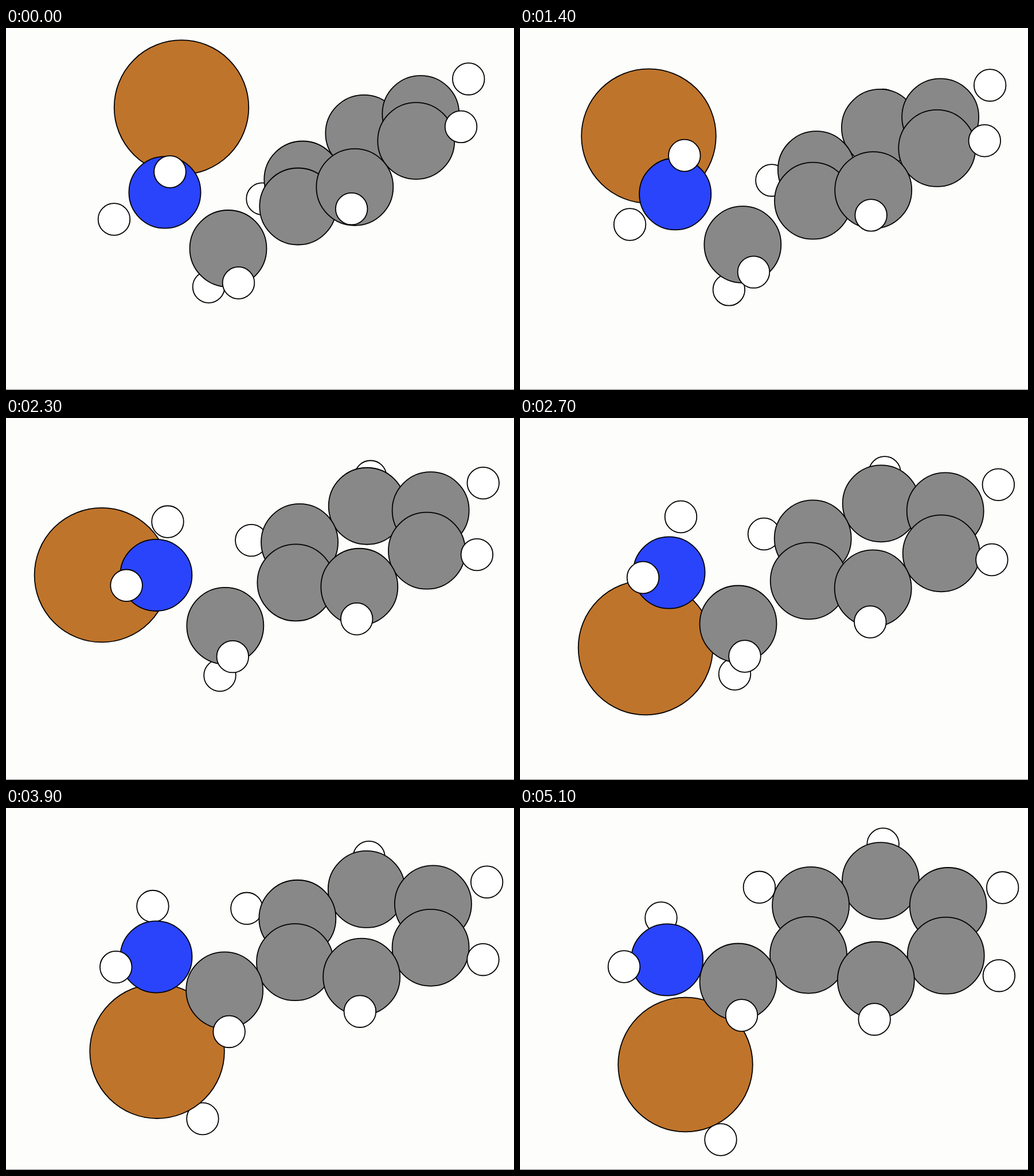
Animation, 886 px wide and 632 px high, one loop 5.2 s. Source, as an HTML page with a canvas:

```html
<!DOCTYPE html>
<html lang="en">
<head>
<meta charset="utf-8">
<title>Molecule</title>
<style>
  html, body { margin: 0; width: 100%; height: 100%; overflow: hidden; background: #fdfdfb; }
  canvas { display: block; }
</style>
</head>
<body>
<canvas id="stage" width="886" height="632"></canvas>
<script>
const ctx = document.getElementById('stage').getContext('2d');
const LOOP = 5200, STEP = 100;
const TIMES = [0, 900, 1800, 2700, 3500, 4400, 5100];

const KINDS = {
  metal: { r: 117.3, fill: '#bf742b' },
  nitrogen: { r: 62.6, fill: '#2a44fb' },
  carbon: { r: 67, fill: '#888888' },
  hydrogen: { r: 27.8, fill: '#ffffff' }
};

// Each path is a flat run of x, y pairs, one pair per entry of its times.
const paths = {
  centre: [616.3, 230.8, 619.5, 229.4, 624.1, 227.8, 622.7, 223.3, 623.8, 220.2, 625.3, 215.9, 624.9, 213.8],
  axisP: [107, -80.7, 109.2, -76.2, 112.6, -70.8, 119, -61, 119.9, -54.1, 121.1, -46.8, 121.9, -42.8],
  axisQ: [8, -47, 6.3, -50.7, 5.5, -57.7, 7, -74, 5.2, -73.5, 3.2, -80, 4.1, -86.7],
  nitrogen: [277, 287, 273.5, 289, 268.5, 290.5, 260, 270, 263.5, 257.5, 260, 263, 256.5, 265],
  amineLeft: [188.5, 334, 188.5, 343, 194, 343, 214.5, 278.5, 195.5, 277, 187, 278.5, 181.5, 277],
  amineTop: [286, 251, 286, 235, 287.5, 212.5, 280.5, 172.5, 261.5, 164, 249, 181, 246, 192],
  bridge: [387.5, 385, 387.5, 382, 389, 375, 380.5, 359.5, 380.5, 324.5, 382, 310.5, 380.5, 303.5],
  leaving: [353.5, 452, 360.5, 456, 367.5, 457.5, 374.5, 447, 348.5, 528.5, 336, 560, 350, 579],
  staying: [405.5, 445, 407.5, 435, 407.5, 419, 392, 416, 388.5, 402, 390, 376, 386.5, 362]
};
const metalTimes = [0, 600, 900, 1200, 1800, 2400, 2500, 2600, 2700, 3000, 3500, 3700, 4400, 5100];
const metalPath = [306, 138.5, 274, 153, 260.5, 163, 236, 173, 201.5, 220, 160, 285, 146, 322,
  178, 372, 219, 401, 184, 400, 267.5, 415, 257, 421, 280, 434, 288.5, 448];

function along(path, t, times = TIMES) {
  let i = 0;
  while (i < times.length - 2 && t >= times[i + 1]) i++;
  let u = (t - times[i]) / (times[i + 1] - times[i]);
  // The fold in the middle starts fast and settles.
  if (times === TIMES && i === 2) u = 1 - (1 - u) ** 1.9;
  const mix = k => path[2 * i + k] + (path[2 * i + 2 + k] - path[2 * i + k]) * u;
  return [mix(0), mix(1)];
}

function atom(kind, [x, y]) {
  const { r, fill } = KINDS[kind];
  ctx.beginPath();
  ctx.arc(x, y, r, 0, 2 * Math.PI);
  ctx.fillStyle = fill;
  ctx.fill();
  ctx.stroke();
}

function draw(t) {
  ctx.fillStyle = '#fdfdfb';
  ctx.fillRect(0, 0, 886, 632);
  ctx.fillStyle = '#777777';
  ctx.fillRect(0, 631, 886, 1);
  ctx.strokeStyle = '#000';
  ctx.lineWidth = 1.8;

  const at = name => along(paths[name], t);
  const o = at('centre'), p = at('axisP'), q = at('axisQ');
  // A flat hexagon is an affine image of two of its corners.
  const corner = (a, b, scale = 1, dx = 0, dy = 0) => [
    o[0] + scale * (a * p[0] + b * q[0]) + dx,
    o[1] + scale * (a * p[1] + b * q[1]) + dy
  ];
  const ringC = (a, b) => atom('carbon', corner(a, b));
  const ringH = (a, b, dx, dy) => atom('hydrogen', corner(a, b, 1.77, dx, dy));
  const bend = Math.max(0, 1 - t / 2400);

  atom('hydrogen', at('leaving'));
  atom('metal', along(metalPath, t, metalTimes));

  ringH(0, 1, 1, 2.6);
  ringH(-1, 1, 1 + 5 * bend, 2.2 + 5.5 * bend);
  ringC(0, 1);
  ringC(-1, 1);
  ringC(1, 0);
  ringH(1, 0, 1, 1);
  ringC(-1, 0);
  ringC(1, -1);
  ringH(1, -1, 2, 1.2);
  ringC(0, -1);
  ringH(0, -1, 0.5, 1.7);

  atom('carbon', at('bridge'));
  atom('hydrogen', at('staying'));

  const topInFront = t < 2700;
  if (!topInFront) atom('hydrogen', at('amineTop'));
  atom('nitrogen', at('nitrogen'));
  if (topInFront) atom('hydrogen', at('amineTop'));
  atom('hydrogen', at('amineLeft'));
}

function frame() {
  draw(Math.floor((performance.now() % LOOP) / STEP) * STEP);
  requestAnimationFrame(frame);
}
frame();
</script>
</body>
</html>
```
